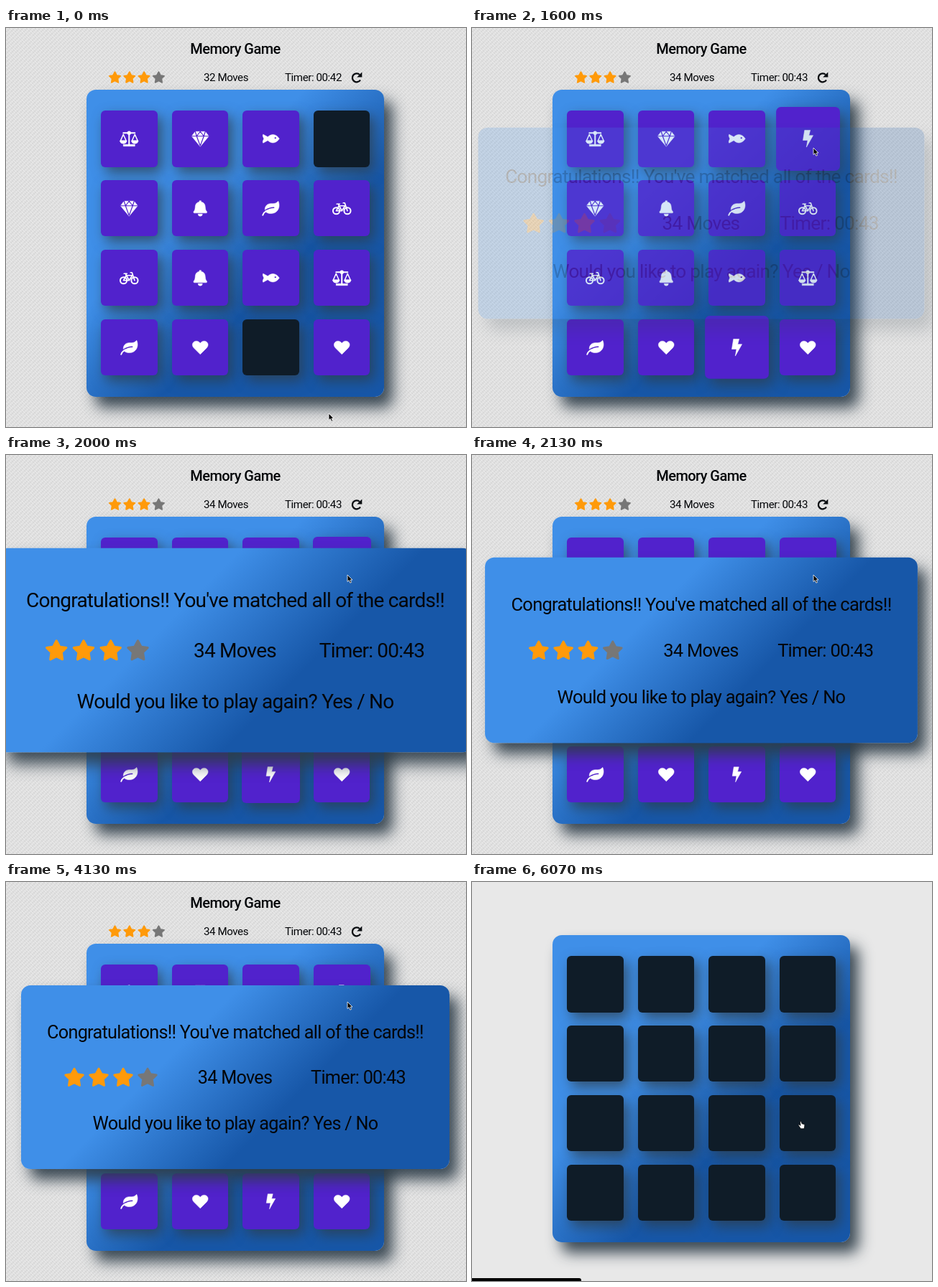
These frames come from a looping animation (640 by 556 pixels, 6140 ms). An HTML page:

```html
<!DOCTYPE html>
<html lang="en">
<head>
<meta charset="utf-8">
<title>Memory Game</title>
<style>
  html, body { margin: 0; width: 100%; height: 100%; overflow: hidden; }
  #stage { position: relative; width: 640px; height: 556px; overflow: hidden; background: #e8e8e8; }
  #stage > *, .card { position: absolute; }
  #stage svg { overflow: visible; display: block; }
  #paper {
    inset: 0;
    background:
      linear-gradient(45deg, #0000 40%, #0000000a 40% 60%, #0000 60%) 0 0 / 4px 4px,
      linear-gradient(-45deg, #0000 40%, #0000000a 40% 60%, #0000 60%) 0 0 / 6px 6px, #e6e6e6;
  }
  text { font-family: Roboto, "Open Sans", sans-serif; letter-spacing: -.028em; text-anchor: middle; fill: #040609; }
  .title { font-size: 20px; font-weight: 500; }
  .small { font-size: 15.1px; }
  .large { font-size: 25.2px; }
  .panel {
    border-radius: 13px;
    background: linear-gradient(135deg, #3f8fe8 36%, #1757a8 63%);
    box-shadow: 12px 15px 20px rgba(46, 61, 73, .92);
  }
  #board { left: 112px; width: 414px; height: 428px; }
  #modal { left: 21px; top: 144px; width: 596px; height: 256px; }
  .card {
    width: 78.5px; height: 78.5px; border-radius: 6px;
    box-shadow: 6px 8px 18px rgba(46, 61, 73, .75);
  }
  .card svg { width: 100%; height: 100%; }
  #status { left: 0; top: 552px; width: 152px; height: 8px; border-radius: 0 3px 0 0; background: #000; }
  #pointer { left: 0; top: 0; }
</style>
</head>
<body>
<div id="stage">
  <div id="paper"></div>
  <svg id="header" width="640" height="86">
    <text class="title" x="319" y="36">Memory Game</text>
    <g class="stars" data-x="151.5" data-y="69" data-gap="20.3" data-size=".86"></g>
    <text class="small moves" x="306" y="74"></text>
    <text class="small timer" x="427.5" y="74"></text>
    <path d="M492 65a6 6 0 1 0 1 7.5" fill="none" stroke="#080b0f" stroke-width="2.3"/>
    <path d="M495.3 61.5v7h-7z" fill="#080b0f"/>
  </svg>
  <div id="board" class="panel"></div>
  <div id="modal" class="panel">
    <svg width="596" height="256">
      <text class="large" x="298" y="74">Congratulations!! You've matched all of the cards!!</text>
      <g class="stars" data-x="74" data-y="128.5" data-gap="34" data-size="1.38"></g>
      <text class="large moves" x="297.5" y="137"></text>
      <text class="large timer" x="469" y="137"></text>
      <text class="large" x="298" y="201">Would you like to play again? Yes / No</text>
    </svg>
  </div>
  <div id="status"></div>
  <svg id="pointer" width="16" height="16">
    <path data-kind="arrow" d="M0 0V9.5L2.2 7.6 3.8 11.2 5.6 10.4 4 7H7Z" fill="#000" stroke="#fff" stroke-width=".8"/>
    <path data-kind="beam" d="M-2-6Q0-6 0-4.5 0-6 2-6M0-4.5V4.5M-2 6Q0 6 0 4.5 0 6 2 6M-1 1H1" fill="none" stroke="#b9c4d0" stroke-width="1.2"/>
    <path data-kind="hand" d="M-1.6-5Q-.8-6 0-5L1-2.2 4-1.4Q5-1 4.8 1L4 4.8H-.6L-4-.2Q-3.6-1.4-2.2-.6L-.9.4Z" fill="#fff" stroke="#000" stroke-width=".7"/>
  </svg>
</div>

<script>
const LOOP = 6140, STEP = 200 / 3;
const PURPLE = '#5122cc', CYAN = '#02a6dd', DARK = '#0f1c28';
const FIRST_CLICK = 470, SECOND_CLICK = 1270, MATCH = 1430, WIN = 1550, HOVER_YES = 5660, RESTART = 6060;

// Icons are centred on the origin; "fill" is solid, "line" is stroked, "cut" shows the card colour.
const icons = {
  scale: [
    ['line', 'M-8-8H8M0-9V9', 2], ['fill', 'M-2.5-8a2.5 2.5 0 0 1 5 0a2.5 2.5 0 0 1-5 0M-8 8H8V10.5H-8Z'],
    ['line', 'M-8-6-12 3H-4ZM8-6 4 3H12Z', 1.5], ['fill', 'M-13 3h10q-1 4-5 4t-5-4M3 3h10q-1 4-5 4t-5-4']],
  gem: [
    ['fill', 'M-7-10H7L12-3.5 0 11-12-3.5Z'],
    ['cut', 'M-12-3.5H12M-5-3.5 0 10 5-3.5M-7-10-5-3.5 0-10 5-3.5 7-10', 1.2]],
  fish: [
    ['fill', 'M12 0C8 6 2 8-4 2.5L-10.5 6Q-12 5-9.5 0-12-5-10.5-6L-4-2.5C2-8 8-6 12 0Z'],
    ['cut', 'M6.3-1h.4', 2]],
  bolt: [['fill', 'M-4-10.5H3L1.3-4H6.5L-1.7 10.5-.2 2H-6Z']],
  bell: [['fill', 'M-1.2-10.5h2.4v1.4c4 .8 5.6 3.6 5.8 7.4 .2 4 1.2 5.2 2.2 6.3q.6 2-1 2h-16.4q-1.6 0-1-2c1-1.1 2-2.3 2.2-6.3 .2-3.8 1.8-6.6 5.8-7.4zM-3 8h6a3 3 0 0 1-6 0z']],
  leaf: [
    ['fill', 'M10.5-10C8.5-7.5 6-6.6 3.3-6.6H0C-4.5-6.6-8-3-8 1.3-8 5-5 7.5 1 7.3 8 7 11.8 1.5 11.8-4 11.8-6.5 11.3-8.5 10.5-10Z'],
    ['cut', 'M-8.3 3.5C-4 .3 0-1 4.5-1', 1.4],
    ['line', 'M-11 9.5C-10 7-7.5 4.3-5 3.2', 2]],
  bike: [
    ['line', 'M-12.3 3.5a4.6 4.6 0 0 1 9.2 0a4.6 4.6 0 0 1-9.2 0M3.1 3.5a4.6 4.6 0 0 1 9.2 0a4.6 4.6 0 0 1-9.2 0', 2],
    ['line', 'M-7.7 3.5-4-3.5H4.5L0 3.5ZM0 3.5-5-6M-7-6h4M2-7.5H4L7.7 3.5', 1.7]],
  heart: [['fill', 'M0 9.5L-9 .5C-15-6.5-5-13 0-6 5-13 15-6.5 9 .5Z']]
};
const deck = 'scale gem fish bolt gem bell leaf bike bike bell fish scale leaf heart bolt heart'.split(' ');
const clickTimes = { 14: FIRST_CLICK, 3: SECOND_CLICK };

// Pointer stops: [time, x, y]
const route = [[0, 449, 537], [380, 375, 452], [600, 375, 452], [1067, 472, 200], [1230, 475, 167],
               [4900, 475, 167], [5300, 463, 270], [5700, 458, 339]];

const $ = selector => document.querySelector(selector);
const $$ = selector => [...document.querySelectorAll(selector)];
const clamp = v => Math.min(1, Math.max(0, v));
const progress = (t, start, duration) => clamp((t - start) / duration);
const pulse = p => 1 + .16 * Math.sin(Math.PI * p);
const show = (element, visible) => { element.style.visibility = visible ? 'visible' : 'hidden'; };

function iconMarkup(name) {
  return icons[name].map(([kind, d, width]) => kind === 'fill'
    ? `<path d="${d}" fill="#fff" stroke="#fff" stroke-width=".5" stroke-linejoin="round"/>`
    : `<path d="${d}" fill="none" stroke="${kind === 'cut' ? 'currentColor' : '#fff'}" stroke-width="${width}" stroke-linejoin="round" stroke-linecap="round"/>`
  ).join('');
}

for (const group of $$('.stars')) {
  const { x, y, gap, size } = group.dataset;
  group.innerHTML = ['#ff9a0a', '#ff9a0a', '#ff9a0a', '#777'].map((color, i) =>
    `<path transform="translate(${+x + i * gap} ${y}) scale(${size})" fill="${color}" stroke="${color}" stroke-width="2"
      stroke-linejoin="round" d="M0-9 3-3.5 8.9-2.6 4.6 1.6 5.5 8 0 5.2-5.5 8-4.6 1.6-8.9-2.6-3-3.5Z"/>`).join('');
}

const cards = deck.map((name, i) => {
  const card = document.createElement('div');
  card.className = 'card';
  card.style.left = 20 + (i % 4) * 98.65 + 'px';
  card.style.top = 29 + Math.floor(i / 4) * 96.9 + 'px';
  card.innerHTML = `<svg viewBox="-39.25 -39.25 78.5 78.5">${iconMarkup(name)}</svg>`;
  $('#board').append(card);
  return card;
});

function drawCard(card, i, t) {
  let color = PURPLE, transform = 'none';
  if (t >= RESTART) {
    color = DARK;
  } else if (i in clickTimes) {
    const flip = progress(t, clickTimes[i], 180);
    color = flip < .5 ? DARK : t < MATCH ? CYAN : PURPLE;
    transform = `scale(${pulse(progress(t, MATCH, 600))}) scaleX(${Math.abs(Math.cos(Math.PI * flip))})`;
  }
  card.style.background = card.style.color = color;
  card.style.transform = transform;
  card.firstChild.style.display = color === DARK ? 'none' : '';
}

function pointerAt(t) {
  const next = route.findIndex(stop => stop[0] > t);
  if (next < 0) return route.at(-1).slice(1);
  const [from, to] = [route[next - 1], route[next]];
  const p = progress(t, from[0], to[0] - from[0]);
  const eased = p * p * (3 - 2 * p);
  return [1, 2].map(k => from[k] + (to[k] - from[k]) * eased);
}

function pointerKind(t, y) {
  const overClosedCard = (t > 330 && t < FIRST_CLICK) || (t > 1130 && t < SECOND_CLICK);
  if (t >= HOVER_YES || overClosedCard) return 'hand';
  return t > 4900 && (Math.abs(y - 209) < 16 || Math.abs(y - 273) < 16) ? 'beam' : 'arrow';
}

function draw(t) {
  const playing = t < RESTART;
  show($('#paper'), playing);
  show($('#header'), playing);
  show($('#status'), t >= HOVER_YES);
  $('#board').style.top = (playing ? 86 : 74) + 'px';
  cards.forEach((card, i) => drawCard(card, i, t));

  const moves = 32 + (t >= FIRST_CLICK) + (t >= SECOND_CLICK);
  $$('.moves').forEach(label => { label.textContent = moves + ' Moves'; });
  $$('.timer').forEach(label => { label.textContent = 'Timer: 00:' + (t < 600 ? 42 : 43); });

  const entry = progress(t, WIN, 595);
  show($('#modal'), playing && entry > 0);
  $('#modal').style.opacity = clamp(entry * 2.31);
  $('#modal').style.transform = `scale(${pulse(entry)})`;

  const [x, y] = pointerAt(t);
  const kind = pointerKind(t, y);
  $('#pointer').style.transform = `translate(${x}px, ${y}px)`;
  $$('#pointer path').forEach(path => show(path, path.dataset.kind === kind));
}

const start = performance.now();
function tick() {
  const t = (performance.now() - start) % LOOP;
  draw(Math.floor(t / STEP + .05) * STEP);
  requestAnimationFrame(tick);
}
tick();
</script>
</body>
</html>
```
